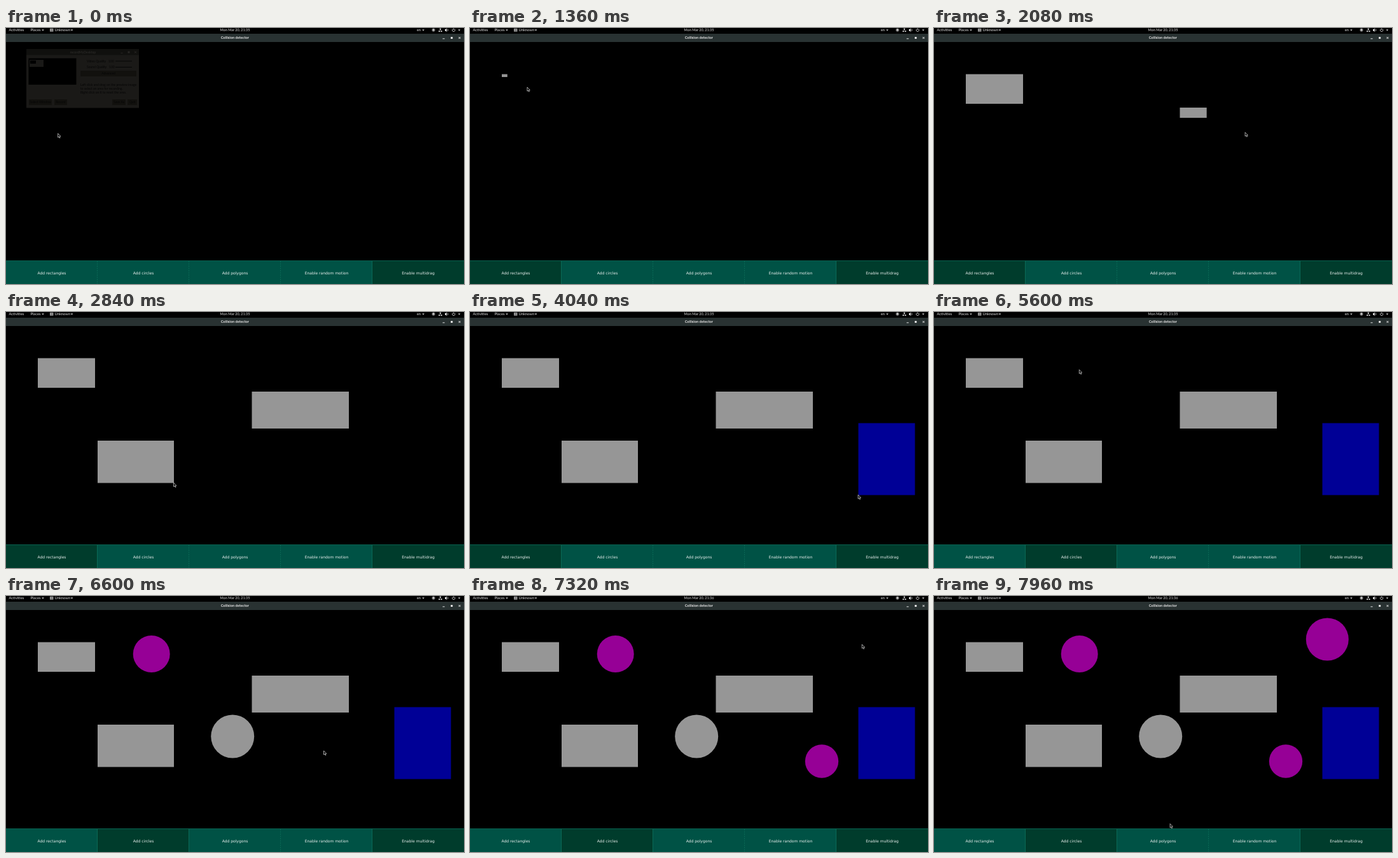
An HTML page with a canvas for the animation above (8000 ms loop, 720 by 402 pixels).

```html
<!DOCTYPE html>
<html lang="en">
<head>
<meta charset="utf-8">
<title>Collision detector</title>
<style>
  html, body { margin: 0; width: 100%; height: 100%; overflow: hidden; background: #000; }
  canvas { display: block; width: 720px; height: 402px; }
</style>
</head>
<body>
<canvas id="stage" width="720" height="402"></canvas>
<script>
const ctx = document.getElementById('stage').getContext('2d');
const LOOP = 8000, DRAG = 260, HOLD = 60, TRAVEL = 560, LAG = 71, FADE = 160;
const GREY = '#969696', BLUE = '#000096', MAGENTA = '#960096', LIGHT = '#e4e4e4';
const UI_FONT = 'Lato, "Open Sans", sans-serif';
const BUTTON_WIDTH = 144, BUTTON_TOP = 365;
const BUTTONS = ['Add rectangles', 'Add circles', 'Add polygons', 'Enable random motion', 'Enable multidrag'];

const clamp = v => Math.min(1, Math.max(0, v));
const ramp = (t, start, length) => clamp((t - start) / length);
const smooth = p => p * p * (3 - 2 * p);
const easeOut = p => 1 - (1 - p) ** 2;
const mix = ([x0, y0], [x1, y1], p) => [x0 + (x1 - x0) * p, y0 + (y1 - y0) * p];

// Pointer actions: it travels to each in turn, then rests, clicks or drags out a shape
const rest = (press, x, y) => ({ press, release: press + HOLD, from: [x, y], to: [x, y] });
const click = (press, button) => ({ ...rest(press, (button + 0.5) * BUTTON_WIDTH, 378), button });
const drag = (kind, color, press, from, to) => ({ kind, color, press, release: press + DRAG, from, to });
const rect = (press, x, y, w, h, color) => drag('rect', color, press, [x, y], [x + w, y + h]);
const circle = (press, x, y, r, angle, color) =>
  drag('circle', color, press, [x, y], [x + r * Math.cos(angle), y + r * Math.sin(angle)]);

const actions = [
  rest(0, 82, 166),
  click(400, 0),
  rect(1240, 50, 72.5, 90, 46.5, GREY),
  rect(1920, 386.5, 125, 152.5, 58, GREY),
  rect(2500, 144, 202, 120, 66.5, GREY),
  rect(3460, 699.5, 174.5, -89, 113, BLUE),
  click(4660, 1),
  rest(5540, 228.7, 91),
  circle(5760, 228.7, 91, 29, 0.8, MAGENTA),
  circle(6220, 356.2, 220.5, 34, -0.33, GREY),
  circle(6760, 553, 259.5, 26.2, 0.1, MAGENTA),
  circle(7400, 618.3, 68, 33.5, 0.6, MAGENTA),
  rest(7960, 371.5, 358)
];
const shapes = actions.filter(action => action.kind);
const clicks = actions.filter(action => 'button' in action);

const dragPoint = (a, t) => mix(a.from, a.to, smooth(ramp(t, a.press, a.release - a.press)));

function pointerAt(t) {
  const i = actions.findLastIndex(a => a.press <= t);
  const current = actions[i], next = actions[i + 1];
  if (!next || t < current.release) return dragPoint(current, t);
  const travel = Math.min(TRAVEL, next.press - current.release);
  return mix(current.to, next.from, easeOut(ramp(t, next.press - travel, travel)));
}

function box(x, y, w, h, color) {
  ctx.fillStyle = color;
  ctx.fillRect(x, y, w, h);
}

function label(text, x, y, font, color = LIGHT, align = 'left') {
  ctx.font = font;
  ctx.fillStyle = color;
  ctx.textAlign = align;
  ctx.fillText(text, x, y);
}

function poly(points, fill, stroke) {
  ctx.beginPath();
  points.forEach(([x, y]) => ctx.lineTo(x, y));
  ctx.closePath();
  ctx.fillStyle = fill;
  ctx.fill();
  if (!stroke) return;
  ctx.strokeStyle = stroke;
  ctx.lineWidth = 0.7;
  ctx.stroke();
}

function line(x0, y0, x1, y1, color, width = 1, dash = []) {
  ctx.setLineDash(dash);
  ctx.strokeStyle = color;
  ctx.lineWidth = width;
  ctx.beginPath();
  ctx.moveTo(x0, y0);
  ctx.lineTo(x1, y1);
  ctx.stroke();
  ctx.setLineDash([]);
}

function ring(x, y, r, from = 0, to = 2 * Math.PI) {
  ctx.beginPath();
  ctx.arc(x, y, r, from, to);
  ctx.strokeStyle = LIGHT;
  ctx.lineWidth = 0.8;
  ctx.stroke();
}

const downArrow = x => poly([[x - 1.8, 2.4], [x + 1.8, 2.4], [x, 4.6]], LIGHT);

function windowControls(minimize, square, close, y, color) {
  box(minimize - 1.6, y + 0.8, 3.2, 1, color);
  box(square - 1.5, y - 1.5, 3, 3, color);
  line(close - 1.5, y - 1.5, close + 1.5, y + 1.5, color);
  line(close + 1.5, y - 1.5, close - 1.5, y + 1.5, color);
}

function drawTopBar(t) {
  const font = '5.8px ' + UI_FONT;
  label('Activities', 4.5, 5.4, font);
  label('Places', 38.5, 5.4, font);
  label('Unknown', 76.5, 5.4, font);
  label('en', 645.8, 5.2, font);
  label('Mon Mar 20, 21:3' + (t < 7000 ? 5 : 6), 360, 5.4, '5.5px ' + UI_FONT, LIGHT, 'center');
  [58, 103.5, 656, 712.5].forEach(downArrow);

  box(69, 1, 5.4, 4.6, '#aaa');
  box(69.8, 2.3, 3.8, 0.6, '#333');
  box(69.8, 3.7, 3.8, 0.6, '#333');

  ring(672, 3.2, 2);
  box(671, 2.2, 2, 2, LIGHT);
  box(681.7, 0.8, 2.2, 1.8, LIGHT);
  box(680.2, 4.2, 2, 1.8, LIGHT);
  box(683.5, 4.2, 2, 1.8, LIGHT);
  line(682.8, 2.4, 682.8, 4, LIGHT, 0.6);
  poly([[690, 2.3], [692.8, 0.9], [692.8, 5.7], [690, 4.3]], LIGHT);
  ring(692.6, 3.3, 2.2, -1, 1);
  ring(703.7, 3.4, 2.2, -1, Math.PI + 1);
  line(703.7, 0.7, 703.7, 3, LIGHT, 0.8);
}

function drawTitleBar() {
  box(0, 9, 720, 13, '#293232');
  label('Collision detector', 359.8, 17.3, 'bold 5.65px ' + UI_FONT, LIGHT, 'center');
  windowControls(688, 700.7, 713, 15.5, LIGHT);
}

function drawButtons(t) {
  const pressed = [0, 0, 0, 0, 1];
  clicks.forEach(({ button, press }, i) => {
    const next = clicks[i + 1];
    pressed[button] = ramp(t, press, FADE) - (next ? ramp(t, next.press, FADE) : 0);
  });
  BUTTONS.forEach((text, i) => {
    const x = i * BUTTON_WIDTH, p = pressed[i];
    box(x, BUTTON_TOP, BUTTON_WIDTH, 37, `rgb(0, ${82 - 22 * p}, ${69 - 25 * p})`);
    label(text, x + BUTTON_WIDTH / 2, 387.3, '6px "DejaVu Sans", sans-serif', '#e9efed', 'center');
  });
  line(0, BUTTON_TOP + 0.5, 720, BUTTON_TOP + 0.5, '#08614f');
  for (let i = 1; i < BUTTONS.length; i++) {
    const solid = pressed[i - 1] + pressed[i] > 0.5, x = i * BUTTON_WIDTH - 0.5;
    line(x, BUTTON_TOP + 1, x, 402, '#0b6956', 1, solid ? [] : [2, 1.5]);
  }
}

function drawFadingWindow(t) {
  const visible = 1 - ramp(t, 0, 120);
  if (!visible) return;
  const font = '5px ' + UI_FONT, ink = '#060606', edge = '#13120f';
  const button = (text, x, y, w) => {
    box(x, y, w, 9, edge);
    label(text, x + w / 2, y + 6.2, font, ink, 'center');
  };
  ctx.globalAlpha = visible;
  box(32, 33, 177, 92.5, '#1b1a18');
  box(32, 33, 177, 9.5, '#11110f');
  label('recordMyDesktop', 121, 39.8, 'bold ' + font, '#292826', 'center');
  windowControls(182, 193, 203.5, 38, '#292826');
  box(35.5, 47.5, 75, 41.5, '#000');
  box(37, 50, 22, 11, '#1b1a18');
  box(38, 51, 9, 5, '#000');
  ['Video', 'Sound'].forEach((name, i) => {
    const y = 53.5 + i * 9.5;
    label(name + ' Quality   100', 127, y, font, ink);
    line(172, y - 1.5, 198, y - 1.5, ink);
  });
  button('Advanced', 117, 67, 88);
  ['Left click and drag on the preview image', 'to select an area for recording.',
   'Right click on it to reset the area.'].forEach((text, i) =>
    label(text, 117, 91 + i * 6.2, font, ink));
  button('Select Window', 36, 112, 36);
  button('Record', 76, 112, 20);
  button('Save As', 167, 112, 21);
  button('Quit', 191, 112, 15);
  ctx.globalAlpha = 1;
}

function drawShape(shape, t) {
  if (t - LAG <= shape.press) return;
  const [x0, y0] = shape.from, [x1, y1] = dragPoint(shape, t - LAG);
  if (shape.kind === 'rect') return box(x0, y0, x1 - x0, y1 - y0, shape.color);
  ctx.fillStyle = shape.color;
  ctx.beginPath();
  ctx.arc(x0, y0, Math.hypot(x1 - x0, y1 - y0), 0, 2 * Math.PI);
  ctx.fill();
}

function drawPointer(t) {
  const [x, y] = pointerAt(t);
  ctx.save();
  ctx.translate(x - 0.4, y - 0.4);
  poly([[0, 0], [0, 6.2], [1.4, 5], [2.5, 7.2], [3.5, 6.7], [2.5, 4.6], [4.3, 4.5]], '#000', LIGHT);
  ctx.restore();
}

function draw(t) {
  box(0, 0, 720, 402, '#000');
  drawTopBar(t);
  drawTitleBar();
  shapes.forEach(shape => drawShape(shape, t));
  drawFadingWindow(t);
  drawButtons(t);
  drawPointer(t);
}

const start = performance.now();
function tick() {
  draw((performance.now() - start) % LOOP);
  requestAnimationFrame(tick);
}
tick();
</script>
</body>
</html>
```
